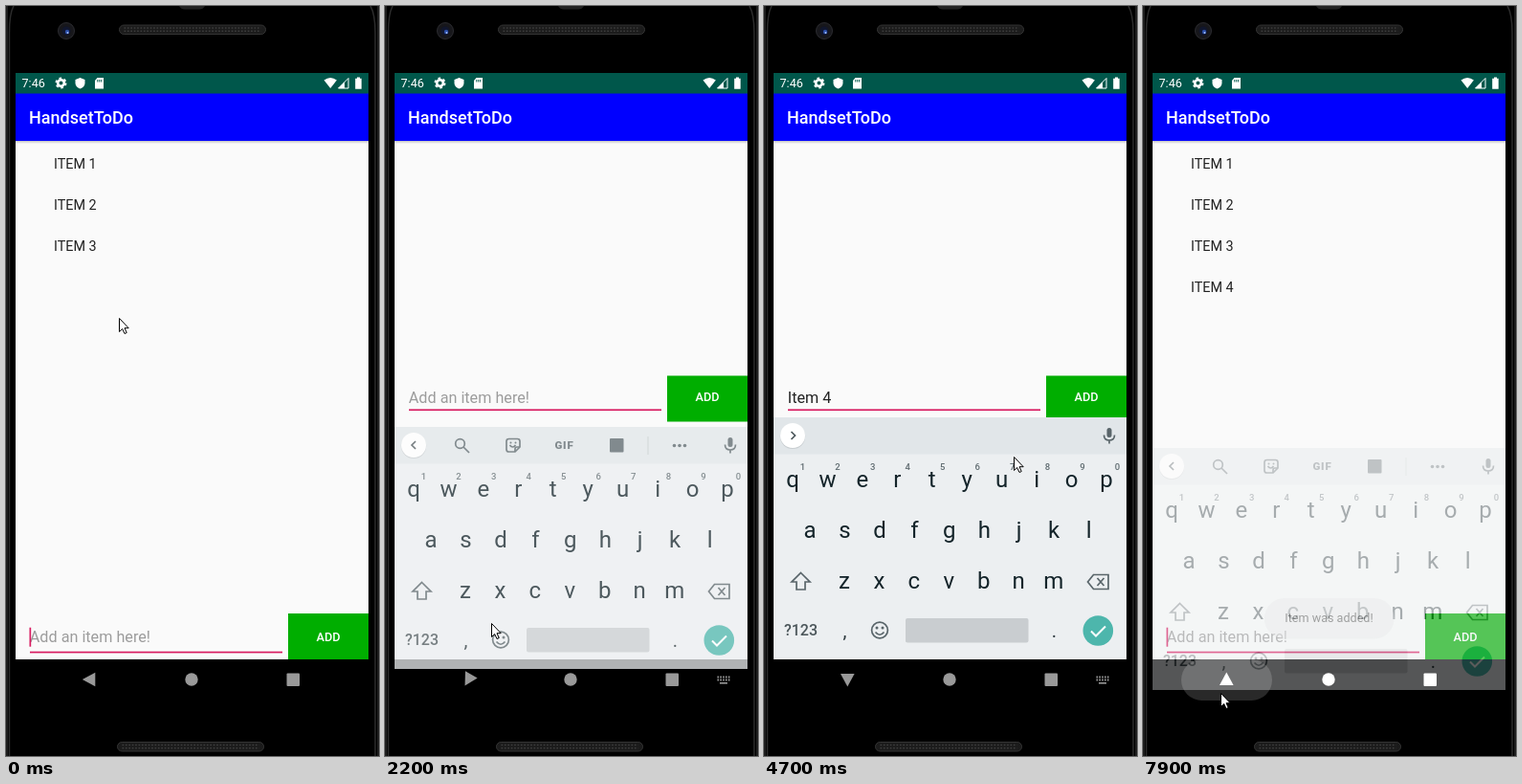
An HTML page for the animation above (8000 ms loop, 390 px wide and 784 px high).

```html
<!DOCTYPE html>
<html lang="en">
<head>
<meta charset="utf-8">
<title>To-do list on a phone</title>
<style>
html, body { margin: 0; width: 100%; height: 100%; overflow: hidden; background: #000; }
svg { display: block; width: 390px; height: 784px; font-family: Roboto, sans-serif; }
.mid { text-anchor: middle; }
.med { font-weight: 500; }
.line { fill: none; stroke: #59656a; stroke-width: 1.7; }
</style>
</head>
<body>
<svg id="stage" viewBox="0 0 390 784"></svg>
<script>
const LOOP = 8000, STEP = 100, ENTRY = 'Item 4';

// [time, value...] rows, interpolated linearly
const POINTER = [
  [0, 118, 326], [500, 118, 326], [700, 147, 419], [900, 147, 419], [1600, 111, 645],
  [4300, 111, 645], [4900, 336, 384], [5200, 343, 401], [5800, 343, 401],
  [6200, 172, 460], [6300, 155, 488], [6600, 155, 488], [7000, 75, 724],
  [7200, 75, 724], [7300, 81, 718]
];
const KEYBOARD = [ // offset, opacity
  [2000, 32, 0], [2100, 28, .3], [2200, 10, .75], [2300, 0, 1],
  [7700, 0, 1], [7800, 14, .7], [7900, 32, .36], [8000, 50, 0]
];
const TOAST = [[5400, 0], [5800, 1], [7500, 1], [8000, .3]];
const BACK = [[2000, 0], [2300, -90], [7600, -90], [7700, -90], [7900, -270]];
const RIPPLE = [[7500, 0], [7800, 1]];
const CARET_ON = [[0, 100], [600, 1000], [1500, 1900], [2600, 3800], [4200, 4700],
  [5200, 5900], [6500, 7000], [7500, 8000]];

const rect = (x, y, w, h, fill, more = '') =>
  `<rect x="${x}" y="${y}" width="${w}" height="${h}" fill="${fill}" ${more}/>`;
const circle = (x, y, r, fill, more = '') =>
  `<circle cx="${x}" cy="${y}" r="${r}" fill="${fill}" ${more}/>`;
const path = (d, more) => `<path d="${d}" ${more}/>`;
const text = (x, y, size, fill, s, more = '') =>
  `<text x="${x}" y="${y}" font-size="${size}" fill="${fill}" ${more}>${s}</text>`;
const group = (id, body, more = '') => `<g id="${id}" ${more}>${body}</g>`;
const at = (x, y, body) => `<g transform="translate(${x} ${y})">${body}</g>`;

function speaker(x, y) {
  let s = rect(x, y, 153, 9.5, '#1b1b1b', 'rx="4.7" stroke="#343434"');
  for (const dy of [3, 6.3])
    s += path(`M${x + 5} ${y + dy}h143`, 'stroke="#3c3c3c" stroke-width="1.6" stroke-dasharray="1.7 1.7"');
  return s;
}

function phone() {
  const edge = 'fill="none" stroke="#2b2b2b" stroke-width="1.5"';
  return rect(0, 0, 390, 784, '#000') +
    rect(0, 0, 2, 784, '#1d1d1d') + rect(388, 0, 2, 784, '#1d1d1d') +
    path('M8 0Q3.500 8 3.500 28V784', edge) + path('M381 0Q386 8 386 28V784', edge) +
    path('M181 0h27q-2 3.500-6 3.500h-15q-4 0-6-3.500z', 'fill="#222"') +
    speaker(118.5, 20) + speaker(116.500, 769.5) +
    circle(63, 26, 8.5, '#17171b', 'stroke="#2c2c30"') +
    circle(63, 26, 4.5, '#10162e') + circle(64, 27, 2.2, '#2c4fa8') + circle(64.5, 28, .9, '#a9c4ff');
}

function statusBar() {
  const white = 'fill="#fff"';
  return rect(10, 70, 369, 21.5, '#00574b') + text(16.5, 85.2, 12.6, '#fff', '7:46') +
    at(57.5, 80.5,
      circle(0, 0, 3.3, 'none', 'stroke="#fff" stroke-width="2.6"') +
      circle(0, 0, 5, 'none', 'stroke="#fff" stroke-width="2" stroke-dasharray="2.6 2.636"')) +
    path('M77.500 75l5 2v3.500c0 3-2 5-5 6-3-1-5-3-5-6v-3.500z', white) +
    path('M95.500 75h6.500v11.500h-9v-8.500z', white) +
    path('M95.800 77v2.500m2-2.500v2.500m2-2.500v2.500', 'stroke="#00574b"') +
    path('M332.500 77.500q6.700-5 13.400 0l-6.700 8.500z', white) +
    path('M358 75.500v10.500h-10.500z', 'fill="none" stroke="#fff"') +
    path('M354 79.500v6.500h-6.500z', white) +
    path('M367 74.500h3v1.200h1.700v11h-6.500v-11h1.800z', white);
}

function app() {
  const items = [1, 2, 3, 4].map(n =>
    text(50, 127.2 + 43 * n, 14.4, '#222', 'ITEM ' + n, `id="item${n}"`)).join('');
  return rect(10, 141, 369, 542, '#fafafa') + rect(10, 141, 369, 3, 'url(#shade)') +
    rect(10, 91, 369, 50, '#00f') + text(24, 123.3, 18, '#fff', 'HandsetToDo', 'class="med"') +
    group('list', items) +
    group('entry',
      text(24.8, 0, 16.2, '#9c9c9c', 'Add an item here!', 'id="hint"') +
      text(24.8, 0, 16.2, '#222', '', 'id="typed" xml:space="preserve"') +
      rect(24.5, -15, 1.7, 20, '#d81b60', 'id="caret"')) +
    rect(25, 0, 264, 1.7, '#d81b60', 'id="underline"') +
    rect(295, 0, 84, 48, '#00ae00', 'id="button"') +
    text(337, 0, 12.7, '#fff', 'ADD', 'id="add" class="mid med"');
}

function letters(rows) {
  const starts = [30, 48, 84], base = [504.4, 557.4, 610.3];
  return rows.map((row, r) => [...row].map((c, i) =>
    text(starts[r] + 36.45 * i, base[r] - (c > 'Z' ? 1 : 0), 24, '#14242a', c, 'class="mid"')).join('')).join('');
}

function toolbar() {
  const line = 'class="line"', ink = '#59656a';
  const tools = circle(78.5, 447.5, 4.8, 'none', line) + path('M82 451l6 6', line) +
    path('M129.500 442.500h9q2.500 0 2.500 2.500v6l-5 5h-6.500q-2.500 0-2.500-2.500v-8.500q0-2.500 2.500-2.500z', line) +
    path('M141 451h-3q-2 0-2 2v3M130.500 449q3 4 6 0', line) +
    circle(131.5, 446.5, 1, ink) + circle(136.5, 446.5, 1, ink) +
    text(187.5, 453, 11.5, ink, 'GIF', 'class="mid" font-weight="900" letter-spacing=".8"') +
    rect(235, 442, 14.5, 14.5, ink, 'rx="1"') + rect(274.5, 440, 1, 19, '#c5cbce') +
    [302.5, 308, 313.5].map(x => circle(x, 449.5, 1.8, ink)).join('');
  return rect(10, 430, 369, 38.5, '#e1e6e9') +
    circle(30, 449.8, 13.2, '#c8cdd0') + circle(30, 449, 13, '#fff') +
    path('M32 445l-4 4 4 4', 'id="less" fill="none" stroke="#4c575b" stroke-width="1.7"') +
    path('M28.500 445l4 4-4 4', 'id="more" fill="none" stroke="#4c575b" stroke-width="1.7"') +
    group('tools', tools) +
    rect(358.5, 441, 5, 10, ink, 'rx="2.5"') +
    path('M355.500 448.500q0 5.500 5.500 5.500t5.500-5.500M361 454v3.500', line);
}

function keyboard() {
  const line = 'class="line"';
  const shift = 'M38.500 592.500l9.500 9.500h-5v8h-9v-8h-5z';
  const digits = [...'1234567890'].map((d, i) =>
    text(40.5 + 36.55 * i, 485, 9.5, '#5f6b70', d, 'class="mid med"')).join('');
  return rect(10, 430, 369, 253, '#eceff1') + toolbar() + digits +
    group('upper', letters(['QWERTYUIOP', 'ASDFGHJKL', 'ZXCVBNM']) + path(shift, 'fill="#4c575b"')) +
    group('lower', letters(['qwertyuiop', 'asdfghjkl', 'zxcvbnm']) + path(shift, line)) +
    path('M344.500 594.500h15.500v15h-15.500l-6-7.500zM348.500 598l7 8m0-8l-7 8', line) +
    text(38.5, 658.3, 16, '#4c575b', '?123', 'class="mid med"') +
    text(84.500, 660, 20, '#2b383d', ',', 'class="mid"') +
    text(303.5, 660, 20, '#2b383d', '.', 'class="mid"') +
    circle(121, 652.5, 8.4, 'none', line) + circle(118, 650, 1.5, '#59656a') +
    circle(124, 650, 1.5, '#59656a') + path('M116.500 654.500q4.500 5.500 9 0', line) +
    rect(148, 640, 128.5, 25.5, '#c9cdd0', 'rx="2"') +
    circle(349.3, 653, 15.8, '#4db6ac') +
    path('M342 653.500l5 5 10-10', 'fill="none" stroke="#fff" stroke-width="2"');
}

function nav() {
  const keys = path('M347.500 701.500h13m-13 3h13', 'stroke="#999" stroke-width="1.8" stroke-dasharray="1.6 1.25"') +
    rect(350, 707, 8, 1.6, '#999');
  return rect(40, 683, 95, 43, '#fff', 'id="ripple" rx="21.5"') +
    group('buttons',
      at(87.3, 704, path('M-7.500 0L6-7.300V7.300z', 'id="back"')) +
      '<circle cx="194" cy="704" r="6.7"/><rect x="293.500" y="697.500" width="13.500" height="13.500" rx="1"/>') +
    group('imeKey', keys);
}

const toast = group('toast',
  rect(127, 619.5, 135.500, 42, '#d9dcde', 'rx="21" opacity=".5"') +
  rect(127, 619, 135.500, 41.8, '#e9eaeb', 'rx="20.9"') +
  text(194.5, 644, 12.6, '#333', 'Item was added!', 'class="mid"'));

const pointer = path('M.5.500v14l3.200-3 2.300 5 2.200-1-2.200-4.800h4.200z',
  'id="pointer" fill="#fff" stroke="#000"');

document.getElementById('stage').innerHTML =
  '<defs><linearGradient id="shade" x2="0" y2="1"><stop stop-color="#000" stop-opacity=".22"/>' +
  '<stop offset="1" stop-color="#000" stop-opacity="0"/></linearGradient></defs>' +
  phone() + app() + statusBar() + group('keyboard', keyboard()) + nav() + toast + pointer;

const el = id => document.getElementById(id);
const set = (id, name, value) => el(id).setAttribute(name, value);
const show = (id, on) => set(id, 'display', on ? 'inline' : 'none');
const within = (t, from, to) => t >= from && t < to;

function sample(track, t) {
  const next = track.findIndex(row => row[0] > t);
  if (next === 0) return track[0].slice(1);
  if (next < 0) return track[track.length - 1].slice(1);
  const a = track[next - 1], b = track[next], p = (t - a[0]) / (b[0] - a[0]);
  return a.slice(1).map((v, i) => v + (b[i + 1] - v) * p);
}

function render(t) {
  const raised = within(t, 2200, 7800);
  const typed = within(t, 2800, 5400) ? ENTRY.slice(0, t / STEP - 27) : '';
  const capitals = within(t, 2600, 2800), collapsed = within(t, 3700, 5400);

  show('list', !raised);
  show('item4', t >= 5400);
  set('entry', 'transform', `translate(0 ${raised ? 415.2 : 664.7})`);
  set('underline', 'y', raised ? 421.4 : 674.7);
  set('button', 'y', raised ? 386.5 : 635);
  set('add', 'y', raised ? 412.8 : 663.6);
  show('hint', !typed);
  el('typed').textContent = typed;
  set('caret', 'x', typed ? 24.8 + el('typed').getComputedTextLength() : 24.5);
  show('caret', CARET_ON.some(([from, to]) => within(t, from, to)));

  const [drop, alpha] = sample(KEYBOARD, t);
  set('keyboard', 'transform', `translate(0 ${drop})`);
  set('keyboard', 'opacity', alpha);
  show('upper', capitals);
  show('lower', !capitals);
  show('tools', !collapsed);
  show('less', !collapsed);
  show('more', collapsed);

  set('back', 'transform', `rotate(${sample(BACK, t)})`);
  set('ripple', 'opacity', .16 * sample(RIPPLE, t)[0]);
  set('buttons', 'fill', t >= 7800 ? '#fff' : '#999');
  show('imeKey', raised);
  set('toast', 'opacity', sample(TOAST, t)[0]);
  set('pointer', 'transform', `translate(${sample(POINTER, t).map(Math.round).join(' ')})`);
}

function frame() {
  render(Math.floor(performance.now() % LOOP / STEP) * STEP);
  requestAnimationFrame(frame);
}
frame();
</script>
</body>
</html>
```
